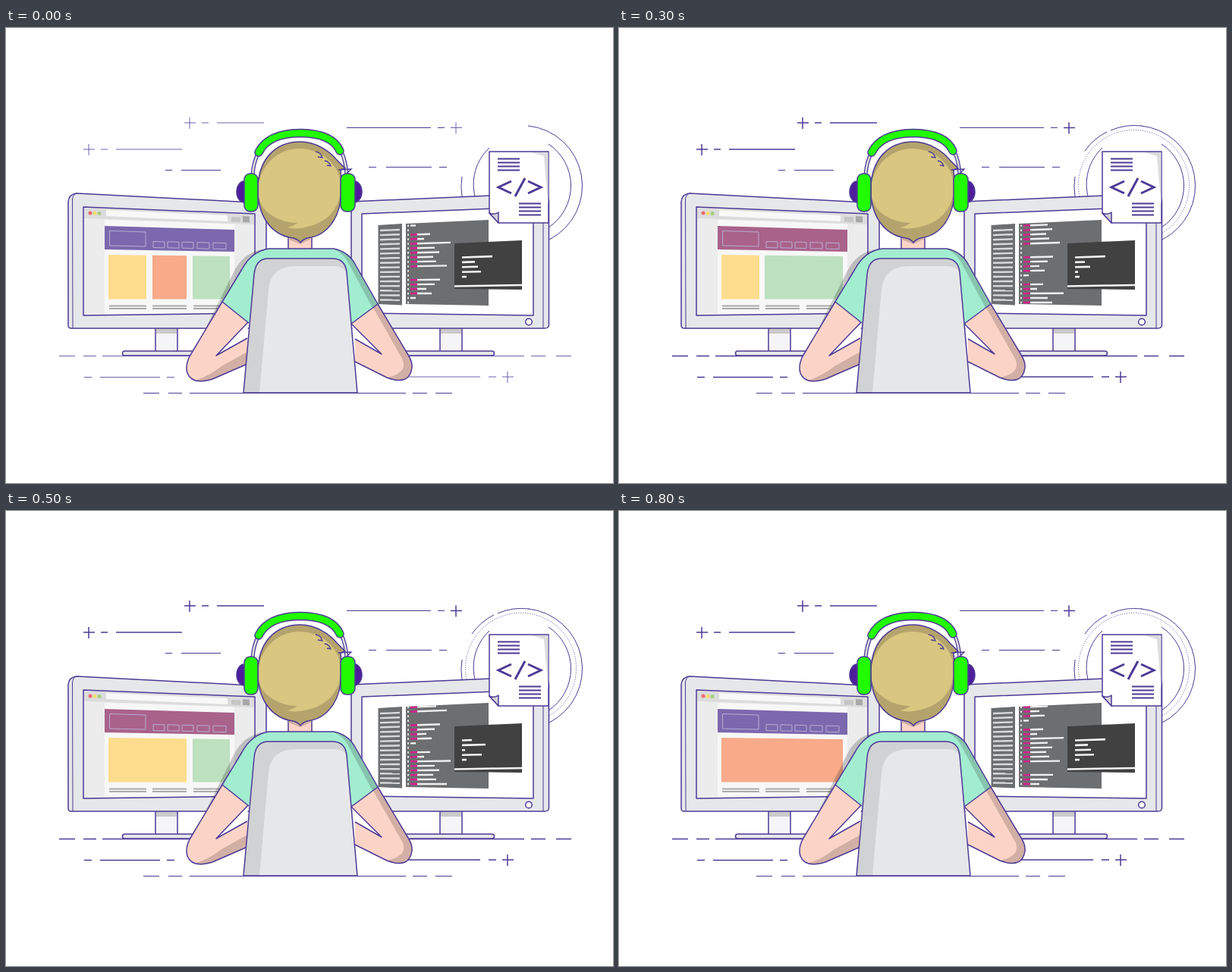
Recreate the animation shown at these times as an HTML page. Size 800x600 px, loop 0.9 s.

```html
<!DOCTYPE html>
<html lang="en">
<head>
<meta charset="utf-8">
<title>Developer at work</title>
<style>
  html, body { margin: 0; width: 100%; height: 100%; overflow: hidden; background: #fff; }
  svg { display: block; width: 100%; height: 100%; }
  .ink { stroke: #4d3a96; stroke-width: 1.5; stroke-linejoin: round; }
  .line { stroke: #4d3a96; fill: none; }
  .body { fill: #e6e7ea; }
  .skin { fill: #fcd4c7; }
  .skinShade { fill: #d2afa5; }
  .mint { fill: #a2edd0; }
</style>
</head>
<body>
<svg viewBox="0 0 800 600">
  <defs>
    <clipPath id="codeClip"><path d="M527 258L636 253V366L527 364Z"/></clipPath>
  </defs>

  <!-- background dashes and rings -->
  <g id="dashes" class="line"></g>
  <path class="line" d="M210 187.5h9M231 187.5h52M449 131.5h111M569 131.5h9M478 183.5h10M501 183.5h60M571 183.5h10M181 481.5h21M214 481.5h18M242 481.5h285M536 481.5h19M566 481.5h22"/>
  <g class="line">
    <path d="M688 129A79.5 79.5 0 0 1 716 279M601 222A79.5 79.5 0 0 1 601 196"/>
    <path d="M640 257A66 66 0 0 1 637 158M715 153A66 66 0 0 1 715 263"/>
    <g id="ringExtras">
      <path d="M614 162A79.5 79.5 0 0 1 643 137M648 135A79.5 79.5 0 0 1 689 129"/>
      <path d="M607 222A73 73 0 1 1 716 270" stroke-dasharray="1 2"/>
    </g>
  </g>

  <!-- stands -->
  <g class="ink" fill="#f5f5f7">
    <path d="M197 395H226V427H197ZM572 395H601V427H572Z"/>
    <path fill="#cacacc" stroke="none" d="M198 396h27v7h-27zM573 396h27v7h-27z"/>
    <rect class="body" x="153.500" y="426" width="110" height="6" rx="3"/>
    <rect class="body" x="520" y="426" width="123.500" height="6" rx="3"/>
  </g>

  <!-- left monitor -->
  <path class="ink body" d="M82 392V229Q83 219 93 218L343 231V396H86Q82 396 82 392Z"/>
  <path class="line" d="M88 396L87.500 226Q88 220 93 218"/>
  <path fill="#ececed" d="M102 236L328 245V376L102 379Z"/>
  <path fill="#f7f7f7" d="M130 253L301 258V376L130 378Z"/>
  <path fill="#dcdcdd" d="M103 237L327 246V259L103 251Z"/>
  <path fill="#f8f8f8" d="M132 240L292 247V255L132 248Z"/>
  <path fill="#c5c5c5" d="M297 249L309 249.500V256L297 255.500Z"/>
  <path fill="#a8a8a8" d="M312 248L321 248.500V256.500L312 256Z"/>
  <circle cx="111" cy="244" r="2.500" fill="#ef6a70"/>
  <circle cx="117" cy="244.300" r="2.500" fill="#f5dc68"/>
  <circle cx="123" cy="244.600" r="2.500" fill="#aacb7c"/>
  <path id="banner" d="M130 261L301 266V295L130 292Z"/>
  <path fill="none" stroke="#b8add5" d="M136.500 267.500L184 269V288L136.500 287ZM194 281.500l15 .4v8l-15-.4zM213 281.800l15 .4v8l-15-.4zM232 282.200l15 .4v8l-15-.4zM252 282.700l16 .4v8l-16-.4zM273 283.200l17 .4v8l-17-.4z"/>
  <g id="cards"></g>
  <path stroke="#aaa" stroke-width="1.800" d="M136 366.500h49M193 366.500h45M247 366.500h48M136 370h49M193 370h45M247 370h48"/>
  <path class="ink" fill="none" d="M102 236L328 245V376L102 379Z"/>

  <!-- right monitor -->
  <path class="ink body" d="M455 229L709 218Q715 220 715.500 228V392Q715 396 710 396H455Z"/>
  <path class="line" d="M708 224V396"/>
  <path class="ink" fill="#fff" d="M469 245L695 236V379L469 376Z"/>
  <circle class="ink" cx="689" cy="387.500" r="4.300" fill="#fff"/>
  <path fill="#6d6e70" d="M490.500 260L522 258V365.500L490.500 364ZM527 258L636 253V366L527 364Z"/>
  <g id="sidebar"></g>
  <g id="code" clip-path="url(#codeClip)"></g>
  <path fill="#414142" d="M591 284L680 280V345L591 344Z"/>
  <path stroke="#f3f3f3" stroke-width="2.500" d="M591 340.500L680 339"/>
  <g id="terminal"></g>

  <!-- document -->
  <path class="ink" fill="#fff" d="M637 163H715V257H649L637 244Z"/>
  <path fill="#dcdcde" d="M692 164H714.500V234L709 169Z"/>
  <path class="ink" fill="#d3d3d7" d="M637 244Q644 247 649 243V257Z"/>
  <path class="line" stroke-width="1.800" d="M648 172.500h29M648 177.500h29M648 182.500h29M648 187.500h29M676 231.500h29M676 236.500h29M676 241.500h29M676 246.500h29"/>
  <path class="line" stroke-width="3" d="M666 202L649 210L666 218M684 198L671 222M688 202L705 210L688 218"/>

  <!-- shirt and arms -->
  <path fill="#000" fill-opacity=".2" d="M346 291C324 293 311 301 300 322L263 396H268L290 361L330 300Z"/>
  <path fill="#fff" d="M319 388L277 432L318 410ZM455 390L495 430L460 410Z"/>
  <path class="skin" d="M285 361L319 388L277 432L318 409V443L272 463Q245 471 239 455Q236 445 242 433ZM490 364L455 390L495 430L460 410V440L502 461Q532 472 535 448Q536 441 530 431Z"/>
  <path class="skinShade" d="M248 465Q266 460 284 446L318 427V443L272 463Q258 468 248 465ZM490 364L484 369L522 436Q531 454 503 461Q532 472 535 448Q536 441 530 431Z"/>
  <path class="ink" fill="none" d="M285 361L242 433Q236 445 239 455Q245 471 272 463L318 443M319 388L277 432L318 409M490 364L530 431Q536 441 535 448Q532 472 502 461L460 440M455 390L495 430L460 410"/>
  <path class="skin ink" d="M372 270H403V292H372Z"/>
  <path class="skinShade" d="M372.500 275H402.500V278L388 285L372.500 279Z"/>
  <path class="mint" d="M347 291H432Q452 295 461 313L490 364L455 390L430 340H340L320 389L285 361L311 318Q324 294 347 291Z"/>
  <path fill="#87c4ad" d="M432 291Q452 295 461 313L490 364L483 369L453 313Q447 299 432 291Z"/>
  <path class="ink" fill="none" d="M320 389L285 361L311 318Q324 294 347 291H432Q452 295 461 313L490 364L455 390"/>

  <!-- chair -->
  <path fill="#d1d2d4" d="M313 481L327 325Q329 304 346 304H430Q447 304 449 322L463 481Z"/>
  <path class="body" d="M334 481L346 345Q349 314 382 314H432Q448 314 449.500 327L463 481Z"/>
  <path class="ink" fill="none" d="M313 481L327 325Q329 304 346 304H430Q447 304 449 322L463 481Z"/>

  <!-- headphones and head -->
  <g fill="none">
    <path class="line" stroke-width="5" d="M333 164Q326 177 325 194M442 163Q448 176 449 194"/>
    <path stroke="#dcdce1" stroke-width="2.500" d="M333 164Q326 177 325 194M442 163Q448 176 449 194"/>
  </g>
  <ellipse class="ink" cx="314" cy="216" rx="10" ry="14" fill="#4f1d9c"/>
  <ellipse class="ink" cx="459" cy="216" rx="10" ry="14" fill="#4f1d9c"/>
  <path id="hair" class="ink" fill="#b5a36d" d="M332 213C332 174 354 150 388 150C409 150 427 163 436 174L447 185L441 187Q442 198 442 213C442 249 424 274 397 277Q391 279 388 283Q384 278 378 277C350 273 332 249 332 213Z"/>
  <path fill="#d8c681" d="M333 204C340 176 360 160 386 159C416 159 440 181 441 206C442 232 430 249 410 258C395 264 380 266 370 263Q378 262 384 257C358 257 333 240 333 220Z"/>
  <path class="line" stroke-width="1.300" d="M408 163Q415 164 417 171L411 170M420 175Q426 176 428 182L423 181M438 187L455 186L447 194"/>
  <g fill="none" stroke-linecap="round">
    <path class="line" stroke-width="11.500" d="M333 164Q345 139 388 138.500Q430 139 440 162"/>
    <path stroke="#21fb00" stroke-width="8.700" d="M333 164Q345 139 388 138.500Q430 139 440 162"/>
  </g>
  <g class="ink" fill="#21fb00">
    <rect x="314" y="192" width="18" height="50" rx="8"/>
    <rect x="441" y="192" width="19" height="50" rx="8"/>
  </g>
</svg>

<script>
const STEP = 100, STEPS = 9;
const ROW = 6, SCROLL = 10;
const $ = id => document.getElementById(id);

const YELLOW = '#fddc8d', ORANGE = '#f8aa89', GREEN = '#bde0be';
const VIOLET = '#7b68ae', PLUM = '#a9628a';

const pages = [
  { banner: VIOLET, cards: [[135, 185, YELLOW], [193, 238, ORANGE], [246, 295, GREEN]] },
  { banner: PLUM, cards: [[135, 185, YELLOW], [192, 295, GREEN]] },
  { banner: PLUM, cards: [[135, 238, YELLOW], [246, 295, GREEN]] },
  { banner: VIOLET, cards: [[135, 295, ORANGE]] }
];
const pageAt = [0, 0, 0, 1, 1, 2, 2, 3, 3];

// Right ends of the text rows; 0 is an empty row.
const codeRows = [586, 565, 571, 563, 567, 581, 0, 0, 572, 565, 554, 561, 540, 0, 559, 551];
const outputs = [
  [641, 618, 622, 626, 607],
  [641, 614, 621, 605, 607],
  [614, 632, 605, 627, 607]
];
const outputAt = [0, 0, 1, 1, 0, 2, 2, 2, 0];

const line = (x1, y1, x2, y2, color, width = 2.4) =>
  `<path d="M${x1} ${y1}L${x2} ${y2}" stroke="${color}" stroke-width="${width}"/>`;

const plus = (x, y) => `M${x - 7} ${y}h15M${x} ${y - 7}v15`;
$('dashes').innerHTML = `<path d="${plus(242, 125)}M258 125h9M278 125h62
  ${plus(109, 160)}M125 160h9M145 160h87${plus(593, 131.5)}
  M70 432.500h21M102 432.500h17M127 432.500h118M530 432.500h153M692 432.500h19M725 432.500h20
  M103 460.500h10M124 460.500h79M212 460.500h10M530 460h95M636 460h10${plus(661, 460)}"/>`;

$('sidebar').innerHTML = Array.from({ length: 16 }, (_, i) => {
  const y = 267 + i * 6.1;
  return line(493, y, 519, y - 1 + i / 12, '#dadada');
}).join('');

function codeLine(y, end) {
  const slope = -0.04 * (366 - y) / 108;
  const part = (from, to, color) =>
    line(from, y + slope * (from - 550), to, y + slope * (to - 550), color);
  let row = part(529, 531, '#e6e6e6');
  if (!end) return row;
  if (end > 540) row += part(533, 542, '#d61f8d');
  return row + part(end > 540 ? 542 : 533, end, '#f0f0f0');
}

function drawCode(step) {
  const period = ROW * codeRows.length;
  const top = 284 - SCROLL * step;
  let rows = '';
  codeRows.forEach((end, i) => {
    for (let y = top + i * ROW - period; y < 370; y += period)
      if (y > 250) rows += codeLine(y, end);
  });
  $('code').innerHTML = rows;
}

function draw(step) {
  const page = pages[pageAt[step]];
  $('banner').setAttribute('fill', page.banner);
  $('cards').innerHTML = page.cards.map(([left, right, color]) => {
    const top = x => 299 + (x - 135) / 80;
    return `<path fill="${color}" d="M${left} ${top(left)}L${right} ${top(right)}V357.500H${left}Z"/>`;
  }).join('');
  $('terminal').innerHTML = outputs[outputAt[step]].map((end, i) => {
    const y = 302.5 + i * 6.4;
    return line(601, y, end, y - (end - 601) * .035 * (1 - i / 6), '#f2f2f2', 2.6);
  }).join('');
  drawCode(step);
  $('dashes').setAttribute('stroke-width', step ? 1.5 : 0.8);
  $('ringExtras').style.display = step ? '' : 'none';
}

let shown = -1;
function tick() {
  const step = Math.floor(performance.now() / STEP) % STEPS;
  if (step !== shown) draw(shown = step);
  requestAnimationFrame(tick);
}
tick();
</script>
</body>
</html>
```
